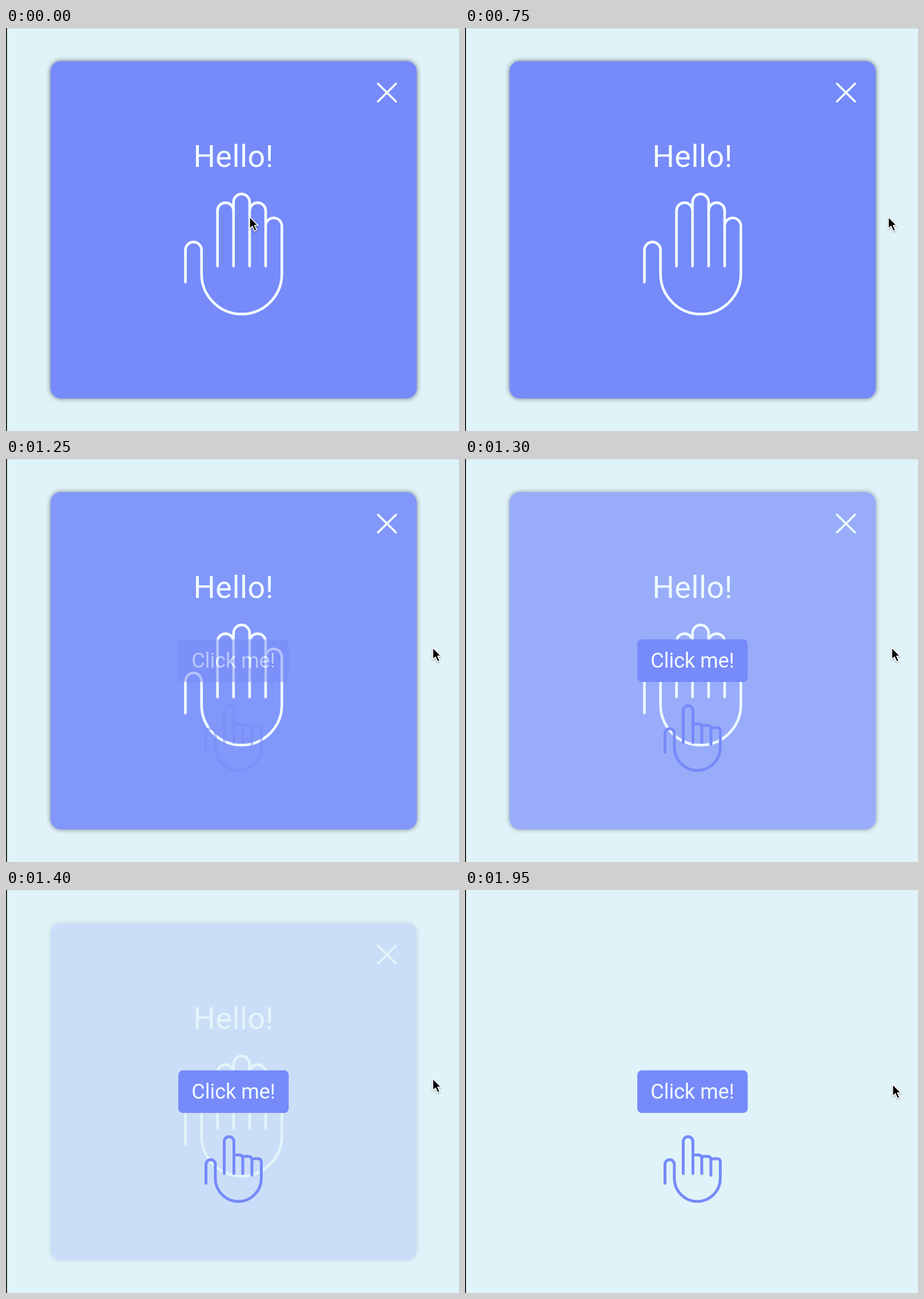
Recreate the animation shown at these times as an HTML page. Size 794 by 705 pixels, loop 2 s.

```html
<!DOCTYPE html>
<html lang="en">
<head>
<meta charset="utf-8">
<title>Hello dialog</title>
<style>
  html, body { margin: 0; width: 100%; height: 100%; overflow: hidden; background: #dff3f8; }
  svg { display: block; width: 794px; height: 705px; }
  text { font-family: Roboto, "Open Sans", sans-serif; text-anchor: middle; fill: #f4fdff; }
  .line { fill: none; stroke: #f4fdff; stroke-width: 4.6; stroke-linecap: round; stroke-linejoin: round; }
  .blue { fill: #768afa; }
  #pointing { stroke: #768afa; stroke-width: 5; }
</style>
</head>
<body>
<svg viewBox="0 0 794 705">
  <defs>
    <filter id="shadow" x="-10%" y="-10%" width="120%" height="120%">
      <feDropShadow dx="0" dy="0" stdDeviation="4" flood-color="#000" flood-opacity=".55"/>
    </filter>
    <filter id="soft" x="-50%" y="-50%" width="200%" height="200%">
      <feDropShadow dx="0" dy="1.5" stdDeviation="1.2" flood-color="#000" flood-opacity=".35"/>
    </filter>
  </defs>
  <rect width="794" height="705" fill="#dff3f8"/>

  <g id="dialog">
    <rect width="794" height="1" fill="#c5d8dd"/>
    <rect class="blue" x="78" y="58" width="642" height="590" rx="18" filter="url(#shadow)"/>
    <path class="line" style="stroke-width:3.8" d="M652 97.5l31.5 31M683.5 97.5l-31.5 31"/>
    <text x="398.7" y="243" font-size="54" letter-spacing=".4">Hello!</text>
    <path class="line" d="M314.5 444.5V388.5a14.1 14.1 0 0 1 28.2 0V430a70.4 70.4 0 0 0 140.8 0V346.5a14.2 14.2 0 0 0 -28.4 0
      M370.7 416.5V318.5a14.1 14.1 0 0 1 28.1 0
      M398.8 416.5V304.5a14.1 14.1 0 0 1 28.2 0V416.5
      M427 318.5a14.1 14.1 0 0 1 28.1 0V416.5"/>
  </g>

  <g id="prompt">
    <rect class="blue" x="302" y="315.5" width="193.5" height="74.5" rx="8"/>
    <text x="398.7" y="364.5" font-size="36">Click me!</text>
    <path id="pointing" class="line" d="M350.5 513V480a8.2 8.2 0 0 1 16.4 0V504.5a40.3 40.3 0 0 0 80.6 0V476q0 -6 -6 -6h-5q-4 0 -5 2
      M382.5 496V440a8.5 8.5 0 0 1 17 0V496
      M399.5 463.5h9q6.5 0 6.5 6.5V496
      M415 468q1 -2 4 -2h6q6 0 6 6V499"/>
  </g>

  <g id="cursor" filter="url(#soft)">
    <path d="M0 0V20.5L4.8 16.2L8.6 24.5L12.3 22.9L8.6 14.8H14.5Z"
      fill="#000" stroke="#fff" stroke-width="1.5" stroke-linejoin="round"/>
  </g>
  <rect width="1.6" height="705" fill="#000"/>
</svg>
<script>
  const LOOP = 2000, STEP = 50;
  const [dialog, prompt, cursor] = ["dialog", "prompt", "cursor"].map(id => document.getElementById(id));

  const progress = (t, from, to) => Math.min(1, Math.max(0, (t - from) / (to - from)));
  const smooth = (t, from, to) => {
    const p = progress(t, from, to);
    return p * p * (3 - 2 * p);
  };

  function render(t) {
    dialog.setAttribute("opacity", 1 - smooth(t, 1185, 1485));
    prompt.setAttribute("opacity", progress(t, 1200, 1300));

    const x = 427 + 315 * smooth(t, 300, 750) + 6 * progress(t, 750, 1100) + 1.5 * smooth(t, 1700, 1950);
    const y = 330.5 - 0.5 * progress(t, 750, 1100) + 10 * smooth(t, 1700, 1950);
    cursor.setAttribute("transform", `translate(${x} ${y})`);
  }

  const start = performance.now();
  function tick() {
    const t = (performance.now() - start) % LOOP;
    render(Math.floor(t / STEP) * STEP);
    requestAnimationFrame(tick);
  }
  tick();
</script>
</body>
</html>
```
